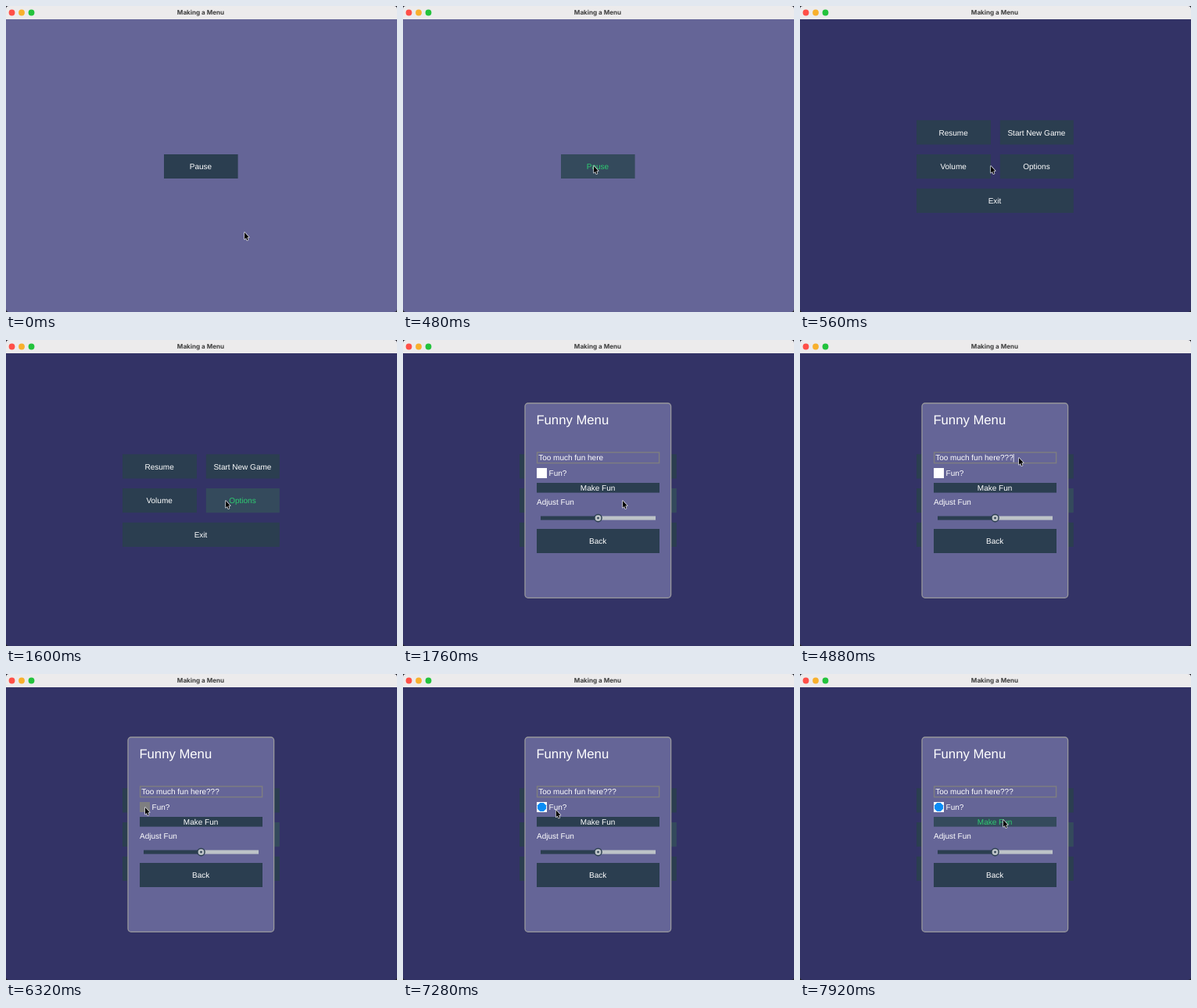
An HTML page with a canvas for the animation above (8000 ms loop, 500 by 392 pixels).

```html
<!DOCTYPE html>
<html lang="en">
<head>
<meta charset="utf-8">
<title>Making a Menu</title>
<style>
  html, body { margin: 0; width: 100%; height: 100%; overflow: hidden; background: #222; }
  canvas { display: block; width: 500px; height: 392px; }
</style>
</head>
<body>
<canvas id="stage" width="500" height="392"></canvas>
<script>
const ctx = document.getElementById('stage').getContext('2d');
const LOOP = 8000, STEP = 80;
const SANS = '"Liberation Sans", Arial, sans-serif';
const C = {
  light: '#656597', dark: '#333366', button: '#2b3e50', hover: '#344a5c',
  silver: '#bdc3c7', grey: '#7e7e80', green: '#2ecc71', blue: '#0a8cf5'
};

// Each click: mouse down, mouse up
const CLICK = {
  pause: [400, 560], options: [1600, 1760], check: [6320, 6480], make: [7920, 8080]
};
const held = (name, t) => t >= CLICK[name][0] && t < CLICK[name][1];
const clicked = (name, t) => t >= CLICK[name][1];

// Pointer moves: start time, end time, destination
const HOME = [305, 290];
const MOVES = [
  [0, 400, 244, 205], [1040, 1440, 281, 206], [2160, 3120, 278, 152],
  [3120, 3280, 280, 151], [5520, 6080, 178, 171], [7040, 7840, 260, 187]
];

function pointerAt(t) {
  let [x, y] = HOME;
  for (const [t0, t1, x1, y1] of MOVES) {
    const u = Math.min(1, Math.max(0, (t - t0) / (t1 - t0)));
    const k = u * u * (3 - 2 * u);
    x += (x1 - x) * k;
    y += (y1 - y) * k;
  }
  return { x, y };
}

const inside = (p, x, y, w, h) => p.x >= x && p.x <= x + w && p.y >= y && p.y <= y + h;

function rect(x, y, w, h, color) {
  ctx.fillStyle = color;
  ctx.fillRect(x, y, w, h);
}

function disc(x, y, r, color) {
  ctx.fillStyle = color;
  ctx.beginPath();
  ctx.arc(x, y, r, 0, Math.PI * 2);
  ctx.fill();
}

function text(str, x, y, { size = 10, align = 'left', color = '#fff', font = SANS, weight = '' } = {}) {
  ctx.font = `${weight} ${size}px ${font}`;
  ctx.textAlign = align;
  ctx.fillStyle = color;
  ctx.fillText(str, x, y);
}

function button(label, x, y, w, h, hot, down) {
  rect(x, y, w, h, hot ? C.hover : C.button);
  text(label, x + w / 2 - 0.4, y + h / 2 + 3.6, { align: 'center', color: down ? C.green : '#fff' });
}

function titleBar() {
  rect(0, 0, 500, 17, '#ecebec');
  ['#ff4f47', '#f8b02c', '#23c33c'].forEach((c, i) => disc(7.5 + 12.5 * i, 8.5, 3.9, c));
  text('Making a Menu', 249, 11.3,
    { size: 8.1, align: 'center', color: '#3d3d3d', font: 'Inter, sans-serif', weight: 'bold' });
}

function pauseView(t, p) {
  const box = [202, 190, 94.6, 31];
  button('Pause', ...box, inside(p, ...box), held('pause', t));
}

function menuView(t, p, covered) {
  const w = 95, h = 31.2, left = 149, right = 255.8;
  const items = [
    ['Resume', left, 146.3, w], ['Start New Game', right, 146.3, 94],
    ['Volume', left, 190, w], ['Options', right, 190, 94],
    ['Exit', left, 233.8, 200.8]
  ];
  for (const [label, x, y, bw] of items) {
    const options = label === 'Options';
    const hot = covered ? options : inside(p, x, y, bw, h) && t > CLICK.pause[1] + 480;
    button(label, x, y, bw, h, hot, options && held('options', t));
  }
}

function inputBox(t) {
  ctx.strokeStyle = C.grey;
  ctx.lineWidth = 1.4;
  ctx.strokeRect(171.6, 144, 156, 13.6);
  const marks = [4400, 4640, 4880].filter(k => t >= k).length;
  const value = 'Too much fun here' + '?'.repeat(marks);
  text(value, 173.2, 154.3);
  const caret = [[3360, 3840], [4320, 5360], [5840, 6320]].some(([a, b]) => t >= a && t < b);
  if (caret) rect(173.2 + ctx.measureText(value).width, 146, 0.8, 10.5, '#fff');
}

function checkBox(t) {
  rect(171, 164, 13, 13, held('check', t) ? C.grey : '#fff');
  if (clicked('check', t)) {
    ctx.fillStyle = C.blue;
    ctx.beginPath();
    for (let i = 0; i < 8; i++) {
      const a = Math.PI / 8 + i * Math.PI / 4;
      ctx.lineTo(177.5 + 6 * Math.cos(a), 170.5 + 6 * Math.sin(a));
    }
    ctx.fill();
  }
  text('Fun?', 186.6, 174.3);
}

function slider() {
  rect(176, 225.6, 73.5, 5, C.button);
  rect(249.5, 225.6, 73.5, 5, C.silver);
  disc(249.5, 228.1, 5.3, C.button);
  disc(249.5, 228.1, 3.9, C.silver);
  disc(249.5, 228.1, 1.3, C.button);
}

function panel(t, p) {
  ctx.beginPath();
  ctx.roundRect(156, 81, 186.6, 249.3, 4);
  ctx.fillStyle = C.light;
  ctx.fill();
  ctx.strokeStyle = '#98989c';
  ctx.lineWidth = 1.3;
  ctx.stroke();

  text('Funny Menu', 170.4, 108.4, { size: 16.7 });
  inputBox(t);
  checkBox(t);
  const bar = [171, 183, 157, 12.6];
  button('Make Fun', ...bar, inside(p, ...bar), held('make', t));
  text('Adjust Fun', 171, 211.4);
  slider();
  button('Back', 171, 242, 157, 31);
}

const ARROW = [[0, 0], [0, 8.8], [2, 7], [3.2, 10.2], [4.6, 9.6], [3.3, 6.5], [5.8, 6.3]];

function pointer({ x, y }) {
  ctx.beginPath();
  for (const [dx, dy] of ARROW) ctx.lineTo(x + dx, y + dy);
  ctx.closePath();
  ctx.lineJoin = 'round';
  ctx.lineWidth = 1.3;
  ctx.strokeStyle = '#eeeef2';
  ctx.stroke();
  ctx.fillStyle = '#000';
  ctx.fill();
}

function draw(t) {
  const p = pointerAt(t);
  const paused = clicked('pause', t), options = clicked('options', t);
  ctx.textRendering = 'geometricPrecision';
  rect(0, 0, 500, 392, '#222');
  ctx.save();
  ctx.beginPath();
  ctx.roundRect(0, 0, 500, 392, 4);
  ctx.clip();
  rect(0, 0, 500, 392, paused ? C.dark : C.light);
  titleBar();
  if (paused) menuView(t, p, options);
  else pauseView(t, p);
  if (options) panel(t, p);
  pointer(p);
  ctx.restore();
}

const start = performance.now();
function tick() {
  const t = (performance.now() - start) % LOOP;
  draw(Math.floor(t / STEP) * STEP);
  requestAnimationFrame(tick);
}
tick();
</script>
</body>
</html>
```
